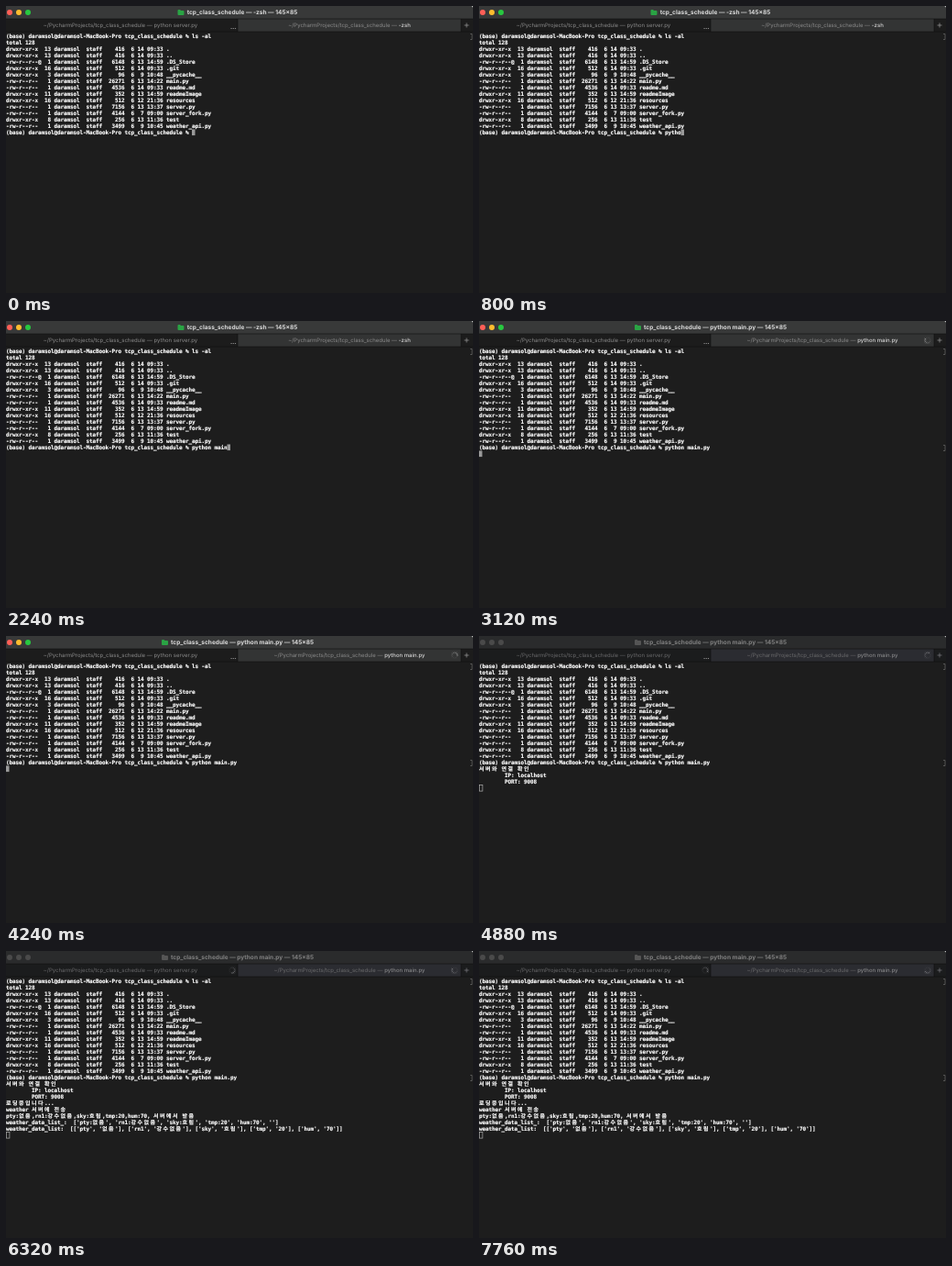
Animation, 510 px wide and 313 px high, one loop 7840 ms. Source, as an HTML page:

```html
<!DOCTYPE html>
<html lang="en">
<head>
<meta charset="utf-8">
<title>Terminal session</title>
<style>
html, body { margin: 0; width: 100%; height: 100%; overflow: hidden; background: #1d1d1d; }
svg { display: block; width: 510px; height: 313px; }
text { white-space: pre; text-rendering: geometricPrecision; }
.row { font: bold 6px "DejaVu Sans Mono", "Noto Sans CJK KR", "Noto Sans CJK", monospace; fill: #fff; stroke: #fff; stroke-width: .15; }
.title { font: 700 6.55px Inter, sans-serif; fill: #dcdcdc; }
.tab { font: 400 6px Inter, sans-serif; fill: #8b8b8b; }
.cmd { font-weight: 500; fill: #d6d6d6; }
.bar { fill: #383939; }
.back { fill: #1c1c1c; }
.front { fill: #333434; }
.folder { fill: #2aa344; }
.plus, .spin line { stroke: #a0a0a0; stroke-width: .7; }
.mark { fill: none; stroke: #777; stroke-width: .6; }
#cursor { fill: #9a9a9a; }
.blur .title { fill: #808080; }
.blur .tab { fill: #6a6a6c; }
.blur .cmd { fill: #858587; }
.blur .bar { fill: #2a2b2c; }
.blur .back { fill: #1b1c1d; }
.blur .front { fill: #2b2c31; }
.blur .folder { fill: #555; }
.blur .light { fill: #4a4a4a; }
.blur .plus, .blur .spin line { stroke: #808084; }
.blur #cursor { fill: none; stroke: #b0b0b0; stroke-width: .7; }
</style>
</head>
<body>
<svg id="stage" viewBox="0 0 510 313">
  <rect width="510" height="313" fill="#1d1d1d"/>
  <rect class="bar" width="510" height="14"/>
  <path d="M508 0h2v2q0-2-2-2" fill="#fff"/>
  <rect class="back" y="14" width="510" height="14"/>
  <rect class="front" x="253" y="14" width="244" height="14"/>
  <path d="M0 14H510M0 28H510M253 14V28M497 14V28" stroke="#101010" stroke-width=".6"/>
  <circle class="light" cx="4" cy="7" r="3" fill="#ff5f57"/>
  <circle class="light" cx="14" cy="7" r="3" fill="#febc2e"/>
  <circle class="light" cx="24" cy="7" r="3" fill="#28c840"/>
  <path id="folder" class="folder" d="M0 1q0-1 1-1h1.5l1 1h2.5q1 0 1 1v3q0 1-1 1h-5q-1 0-1-1z"/>
  <text id="title" class="title" x="258" y="9.4" text-anchor="middle"></text>
  <text class="tab" x="125" y="23.2" text-anchor="middle">~/PycharmProjects/tcp_class_schedule — python server.py</text>
  <text class="tab" x="375" y="23.2" text-anchor="middle">~/PycharmProjects/tcp_class_schedule — <tspan id="cmd" class="cmd"></tspan></text>
  <path id="dots" d="M245.5 24.5h1.2m1 0h1.2m1 0h1.2" stroke="#8b8b8b"/>
  <path class="plus" d="M500.5 21h5M503 18.5v5"/>
  <path class="mark" d="M507 30.5h2v6h-2"/>
  <path id="mark" class="mark" d="M507 135.5h2v6h-2"/>
  <g id="rows"></g>
  <rect id="cursor" width="3.5" height="6.6"/>
</svg>
<script>
const LOOP = 7840, SPIN = 800, CELL = 3.5, LINE = 7, TOP = 29.5;
const ENTER = 3040, CONNECT = 4480, BLUR = 4640, RESULT = 5000;
const USER = 'daramsol';
const PROMPT = `(base) ${USER}@${USER}-MacBook-Pro tcp_class_schedule % `;
const COMMAND = 'python main.py';
const KEYS = [160, 300, 440, 580, 720, 880, 1040, 1360, 1520, 1680, 1840, 2320, 2460, 2600];

const FILES = `d 13 416 14 09:33 .
d 13 416 14 09:33 ..
@ 1 6148 13 14:59 .DS_Store
d 16 512 14 09:33 .git
d 3 96 9 10:48 __pycache__
- 1 26271 13 14:22 main.py
- 1 4536 14 09:33 readme.md
d 11 352 13 14:59 readmeImage
d 16 512 12 21:36 resources
- 1 7156 13 13:37 server.py
- 1 4144 7 09:00 server_fork.py
d 8 256 13 11:36 test
- 1 3499 9 10:45 weather_api.py`;
const MODES = { d: 'drwxr-xr-x ', '-': '-rw-r--r-- ', '@': '-rw-r--r--@' };

const listing = FILES.split('\n').map(file => {
  const [kind, links, size, day, time, name] = file.split(' ');
  return `${MODES[kind]} ${links.padStart(2)} ${USER}  staff  ${size.padStart(5)}  6 ${day.padStart(2)} ${time} ${name}`;
});
const before = [PROMPT + 'ls -al', 'total 128', ...listing];
const connected = ['서버와 연결 확인', '        IP: localhost', '        PORT: 9008'];
const results = [
  '로딩중입니다...',
  'weather 서버에 전송',
  'pty:없음,rn1:강수없음,sky:흐림,tmp:20,hum:70, 서버에서 받음',
  "weather_data_list_:  ['pty:없음', 'rn1:강수없음', 'sky:흐림', 'tmp:20', 'hum:70', '']",
  "weather_data_list:  [['pty', '없음'], ['rn1', '강수없음'], ['sky', '흐림'], ['tmp', '20'], ['hum', '70']]"
];

const $ = id => document.getElementById(id);
const stage = $('stage');

function add(parent, tag, attrs) {
  const el = document.createElementNS('http://www.w3.org/2000/svg', tag);
  for (const key in attrs) el.setAttribute(key, attrs[key]);
  return parent.appendChild(el);
}

// Places each character on the terminal grid; Hangul takes two cells.
function setRow(el, text) {
  let col = 0;
  const xs = [...text].map(ch => {
    const x = col * CELL;
    col += ch >= '가' ? 2 : 1;
    return x;
  });
  el.setAttribute('x', xs.join(' '));
  el.textContent = text.replace(/ /g, '\u00a0');
}

const rows = [];
function print(lines, time) {
  for (const line of lines) {
    const el = add($('rows'), 'text', { class: 'row', y: TOP + 5.5 + rows.length * LINE });
    setRow(el, line);
    rows.push({ el, time });
  }
}
print(before, 0);
print([PROMPT], 0);
const promptRow = rows.length - 1;
print(connected, CONNECT);
print(results, RESULT);

function spinner(x, y, phase) {
  const g = add(stage, 'g', { class: 'spin', transform: `translate(${x} ${y})` });
  for (let i = 0; i < 12; i++) add(g, 'line', { y1: -2, y2: -4, transform: `rotate(${i * 30})` });
  return { g, phase };
}
const spinners = [spinner(247, 21, 8), spinner(490, 21, 0)];

function show(el, on) { el.style.display = on ? '' : 'none'; }

let typed = -1;
function draw(t) {
  const running = t >= ENTER, blurred = t >= BLUR;
  const count = KEYS.filter(k => t >= k).length;
  if (count !== typed) {
    typed = count;
    setRow(rows[promptRow].el, PROMPT + COMMAND.slice(0, count));
  }
  rows.forEach(r => show(r.el, t >= r.time));

  const job = running ? COMMAND : '-zsh';
  $('title').textContent = `tcp_class_schedule — ${job} — 145×85`;
  $('cmd').textContent = job;
  $('folder').setAttribute('transform', `translate(${running ? 170 : 187.5} 4)`);
  stage.classList.toggle('blur', blurred);

  const visible = rows.filter(r => t >= r.time).length;
  const row = running ? visible : promptRow;
  const col = running ? 0 : PROMPT.length + count;
  $('cursor').setAttribute('x', col * CELL + (blurred ? .4 : 0));
  $('cursor').setAttribute('y', TOP + row * LINE);

  show($('mark'), running);
  show($('dots'), t < RESULT);
  show(spinners[0].g, t >= RESULT);
  show(spinners[1].g, running);
  const head = Math.floor(t / SPIN * 12);
  for (const { g, phase } of spinners)
    [...g.children].forEach((spoke, i) => {
      const age = (head + phase - i + 12) % 12;
      spoke.style.opacity = Math.max(.15, 1 - age / 9);
    });
}

const start = performance.now();
function tick() {
  draw((performance.now() - start) % LOOP);
  requestAnimationFrame(tick);
}
tick();
</script>
</body>
</html>
```
